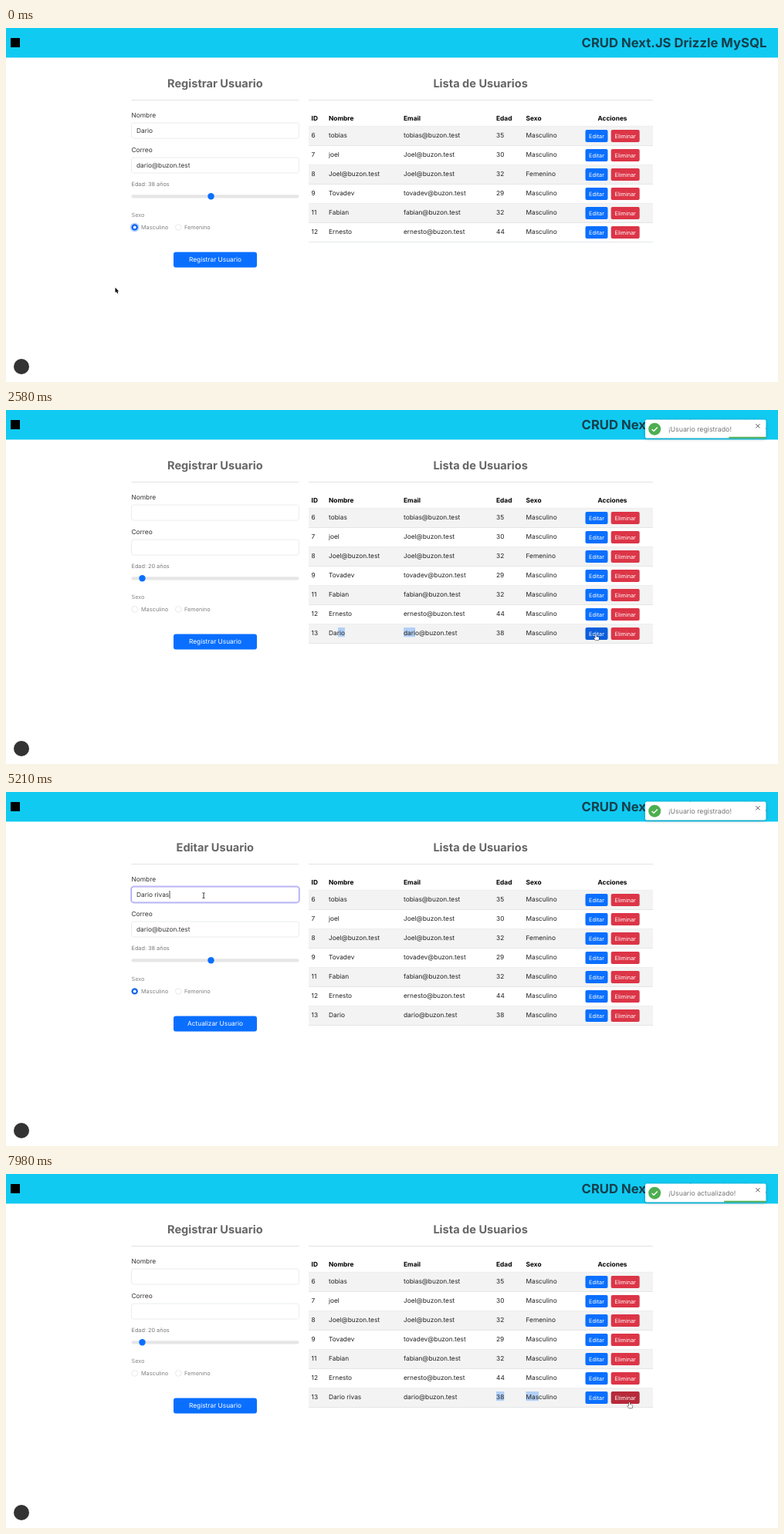
Write an HTML page with a canvas that moves like this. It is 1000 px wide and 459 px high and loops after 8000 ms.

```html
<!DOCTYPE html>
<html lang="es">
<head>
<meta charset="utf-8">
<title>CRUD Next.JS Drizzle MySQL</title>
<style>
  html, body { margin: 0; width: 100%; height: 100%; overflow: hidden; background: #fff; }
  canvas { display: block; }
</style>
</head>
<body>
<canvas id="stage" width="1000" height="459"></canvas>
<script>
const ctx = document.getElementById('stage').getContext('2d');
const LOOP = 8000;
const BODY = 8.33, SMALL = 7.29;
const BLUE = '#0a6fff', BLUE_DARK = '#0c5edb', RED = '#dc3547', RED_DARK = '#b62a3a', GREEN = '#4caf50';

// Moments of the story, in ms
const SUBMIT = 1000, SAVED = 1430, EDIT = 2860, FOCUS = 3900, TYPE = 4400, KEY = 130,
      TOAST_OUT = 5600, UPDATE = 6420, UPDATED = 6680;
const TOAST_FILL = 3750, TOAST_IN = 450;
const SURNAME = ' rivas';

const users = [
  [6, 'tobias', 'tobias@buzon.test', 35, 'Masculino'],
  [7, 'joel', 'Joel@buzon.test', 30, 'Masculino'],
  [8, 'Joel@buzon.test', 'Joel@buzon.test', 32, 'Femenino'],
  [9, 'Tovadev', 'tovadev@buzon.test', 29, 'Masculino'],
  [11, 'Fabian', 'fabian@buzon.test', 32, 'Masculino'],
  [12, 'Ernesto', 'ernesto@buzon.test', 44, 'Masculino'],
];
const columns = [395.6, 418, 515, 635, 673.5];
const editBox = { x: 750.5, w: 29, h: 16 }, deleteBox = { x: 783.7, w: 37, h: 16 };
const submitBox = { x: 217, y: 290.5, w: 108, h: 20 };
const inputs = [123, 168].map(y => ({ x: 162.5, y, w: 217, h: 20 }));

// Pointer stops: time, x, y
const path = [
  [120, 141.5, 336.5], [850, 262, 298], [1250, 262, 298], [1720, 414, 313.5],
  [2000, 430, 291], [2150, 529, 291], [2500, 764, 291], [2900, 764, 291],
  [3450, 373.5, 200.5], [3850, 256, 134], [5450, 256, 134], [6200, 255.5, 298],
  [6500, 255.5, 298], [6920, 439.5, 303.5], [7350, 635, 290], [7550, 690, 290], [7980, 807.5, 296],
];
const selections = [
  { from: 2000, to: FOCUS, x0: 430, x1: 530 },
  { from: 7350, to: LOOP, x0: 635, x1: 690 },
];

const clamp = v => Math.max(0, Math.min(1, v));
const inside = (p, b) => p.x >= b.x && p.x <= b.x + b.w && p.y >= b.y && p.y <= b.y + b.h;

function pointerAt(t) {
  const i = path.findIndex(stop => stop[0] > t);
  if (i < 1) {
    const [, x, y] = i ? path[path.length - 1] : path[0];
    return { x, y };
  }
  const [t0, x0, y0] = path[i - 1], [t1, x1, y1] = path[i];
  const p = (t - t0) / (t1 - t0), e = p * p * (3 - 2 * p);
  return { x: x0 + (x1 - x0) * e, y: y0 + (y1 - y0) * e };
}

function text(str, x, y, size = BODY, color = '#222', weight = 400, align = 'left') {
  ctx.font = `${weight} ${size}px Inter, sans-serif`;
  ctx.textAlign = align;
  ctx.fillStyle = color;
  ctx.fillText(str, x, y);
  return ctx.measureText(str).width;
}

function rect(x, y, w, h, color) {
  ctx.fillStyle = color;
  ctx.fillRect(x, y, w, h);
}

function rounded({ x, y, w, h }, r, fill, stroke, line = 1) {
  ctx.beginPath();
  ctx.roundRect(x, y, w, h, r);
  if (fill) { ctx.fillStyle = fill; ctx.fill(); }
  if (stroke) { ctx.strokeStyle = stroke; ctx.lineWidth = line; ctx.stroke(); }
}

function disc(x, y, r, fill, stroke) {
  ctx.beginPath();
  ctx.arc(x, y, r, 0, 7);
  ctx.fillStyle = fill;
  ctx.fill();
  if (stroke) { ctx.strokeStyle = stroke; ctx.lineWidth = 0.8; ctx.stroke(); }
}

function polyline(points, color, width) {
  ctx.beginPath();
  points.forEach(p => ctx.lineTo(...p));
  ctx.strokeStyle = color;
  ctx.lineWidth = width;
  ctx.stroke();
}

function button(box, label, size, color) {
  rounded(box, size === BODY ? 3 : 2, color);
  text(label, box.x + box.w / 2, box.y + box.h / 2 + size * 0.36, size, '#fff', 400, 'center');
}

function drawPage() {
  rect(0, 0, 1000, 459, '#fff');
  rect(0, 0, 1000, 38.4, '#11caf2');
  rect(6, 13, 12, 12, '#000');
  text('CRUD Next.JS Drizzle MySQL', 985.3, 25, 16.67, '#133f4c', 700, 'right');
  text('Lista de Usuarios', 614.6, 77, 14.58, '#666', 700, 'center');
  rect(162.5, 93, 217, 0.8, '#ddd');
  rect(392, 93, 446, 0.8, '#ddd');
  disc(20, 439, 10, '#333');
}

function drawForm(t, pointer) {
  const editing = t >= EDIT && t < UPDATED;
  const filled = t < SAVED || editing;
  const typed = SURNAME.slice(0, Math.max(0, Math.floor((t - TYPE) / KEY) + 1));
  const focused = t >= FOCUS && t < UPDATE;

  text(editing ? 'Editar Usuario' : 'Registrar Usuario', 270.8, 77, 14.58, '#666', 700, 'center');
  text('Nombre', 162.5, 116, BODY, '#333');
  text('Correo', 162.5, 160.7, BODY, '#333');
  inputs.forEach(box => rounded(box, 3, '#fff', '#e6e8ea', 0.8));
  if (focused) {
    rounded(inputs[0], 3, null, '#d3d2fa', 3.4);
    rounded(inputs[0], 3, '#fff', '#9f9af0', 0.9);
  }
  if (filled) {
    const w = text('Dario' + (editing ? typed : ''), 169, 136.1, BODY, '#333');
    text('dario@buzon.test', 169, 180.9, BODY, '#333');
    const sinceKey = t < TYPE ? t - FOCUS : t - TYPE - KEY * (typed.length - 1);
    if (focused && sinceKey % 1000 < 500) rect(169.4 + w, 128, 0.8, 10, '#222');
  }

  text(`Edad: ${filled ? 38 : 20} años`, 162.5, 205.4, SMALL, '#777');
  rounded({ x: 162.5, y: 216.2, w: 217, h: 4.2 }, 2.1, '#e6e6e6');
  disc(filled ? 265.5 : 176.5, 218.3, 4.2, BLUE);

  text('Sexo', 162.5, 245.2, SMALL, '#888');
  if (t < SUBMIT) disc(166.7, 258.4, 6, '#b9d5ff');
  if (filled) {
    disc(166.7, 258.4, 4.2, '#1266ee');
    disc(166.7, 258.4, 1.9, '#fff');
  } else {
    disc(166.7, 258.4, 3.9, '#fff', '#e4e4e4');
  }
  disc(223.3, 258.4, 3.9, '#fff', '#e4e4e4');
  text('Masculino', 175, 261.4, SMALL, '#808080');
  text('Femenino', 231, 261.4, SMALL, '#808080');

  const pressed = (t >= SUBMIT && t < 2000) || (t >= UPDATE && t < 7350);
  button(submitBox, editing ? 'Actualizar Usuario' : 'Registrar Usuario', BODY,
    pressed || inside(pointer, submitBox) ? BLUE_DARK : BLUE);
}

function drawTable(t, pointer) {
  ['ID', 'Nombre', 'Email', 'Edad', 'Sexo'].forEach((h, i) => text(h, columns[i], 120, BODY, '#000', 700));
  text('Acciones', 785.5, 120, BODY, '#000', 700, 'center');
  rect(392, 126.9, 446, 0.8, '#dfe1e3');

  const rows = [...users];
  if (t >= SAVED) rows.push([13, 'Dario' + (t >= UPDATED ? SURNAME : ''), 'dario@buzon.test', 38, 'Masculino']);
  rows.forEach((row, r) => {
    const top = 127.4 + r * 25;
    if (r % 2 === 0) rect(392, top, 446, 25, '#f3f3f3');
    rect(392, top + 24.6, 446, 0.8, '#dfe1e3');
    row.forEach((cell, c) => {
      if (r === 6) highlight(t, pointer, cell, columns[c], top);
      text(cell, columns[c], top + 14.1);
    });
    const edit = { ...editBox, y: top + 4.6 }, del = { ...deleteBox, y: top + 4.6 };
    button(edit, 'Editar', SMALL, inside(pointer, edit) ? BLUE_DARK : BLUE);
    button(del, 'Eliminar', SMALL, inside(pointer, del) ? RED_DARK : RED);
  });
}

function highlight(t, pointer, cell, x, top) {
  const sel = selections.find(s => t >= s.from && t < s.to);
  if (!sel) return;
  const reach = t - sel.from < 150 ? Math.min(pointer.x, sel.x1) : sel.x1;
  ctx.font = `400 ${BODY}px Inter, sans-serif`;
  const start = Math.max(x, sel.x0), end = Math.min(x + ctx.measureText(cell).width, reach);
  if (end > start) rect(start, top + 4.6, end - start, 12.2, '#b3d0f6');
}

function drawToast(message, age, alpha = 1) {
  if (age < 0 || alpha <= 0) return;
  const rest = (1 - clamp(age / TOAST_IN)) ** 2;
  ctx.save();
  ctx.globalAlpha = (1 - rest) * alpha;
  ctx.translate(906, 24.5);
  ctx.rotate(-9 * rest * Math.PI / 180);
  ctx.translate(-906, -24.5);
  ctx.shadowColor = 'rgba(0,0,0,.25)';
  ctx.shadowBlur = 4;
  ctx.shadowOffsetY = 1;
  rounded({ x: 828, y: 12.6, w: 156.4, h: 24 }, 2, '#fff');
  ctx.shadowColor = 'transparent';
  disc(840.2, 24.7, 8, GREEN);
  polyline([[836.6, 24.9], [839.2, 27.3], [843.8, 22.4]], '#fff', 1.4);
  text(message, 858, 27.9, 8.8, '#777');
  polyline([[971.3, 18.1], [976.5, 23.3]], '#555', 1);
  polyline([[976.5, 18.1], [971.3, 23.3]], '#555', 1);
  const bar = age < TOAST_FILL ? 156.4 * age / TOAST_FILL : 0;
  rect(984.4 - bar, 34.8, bar, 1.9, GREEN);
  ctx.restore();
}

const ARROW = new Path2D('M0 0V6.6L1.5 5.3 2.6 7.8 3.8 7.3 2.7 4.9H4.7Z');
const HAND = new Path2D('M-.7 .6Q0-.4 .7 .6V3L3.6 3.6Q4.4 3.9 4.2 5L3.6 7.6H-.6L-2.6 4.8Q-2.4 3.8-.7 5Z');

function drawPointer({ x, y }, kind) {
  ctx.save();
  ctx.translate(x, y);
  if (kind === 'text') {
    polyline([[0, -3], [0, 3.4]], '#222', 0.9);
    polyline([[-1.6, -3.4], [0, -2.8], [1.6, -3.4]], '#222', 0.8);
    polyline([[-1.6, 3.8], [0, 3.2], [1.6, 3.8]], '#222', 0.8);
  } else {
    const hand = kind === 'hand', shape = hand ? HAND : ARROW;
    ctx.lineWidth = hand ? 0.9 : 1.2;
    ctx.strokeStyle = hand ? '#111' : '#fff';
    ctx.fillStyle = hand ? '#fff' : '#000';
    ctx.stroke(shape);
    ctx.fill(shape);
  }
  ctx.restore();
}

function pointerKind(p) {
  if (inputs.some(box => inside(p, box))) return 'text';
  const row = { y: 282, h: 16 };
  const targets = [submitBox, { ...editBox, ...row }, { ...deleteBox, ...row }];
  return targets.some(box => inside(p, box)) ? 'hand' : 'arrow';
}

function render(t) {
  const pointer = pointerAt(t);
  drawPage();
  drawForm(t, pointer);
  drawTable(t, pointer);
  drawToast('¡Usuario registrado!', t - SAVED, 1 - clamp((t - TOAST_OUT) / 300));
  drawToast('¡Usuario actualizado!', t - UPDATED);
  drawPointer(pointer, pointerKind(pointer));
}

ctx.textRendering = 'geometricPrecision';
const begin = performance.now();
(function tick() {
  render((performance.now() - begin) % LOOP);
  requestAnimationFrame(tick);
})();
</script>
</body>
</html>
```
